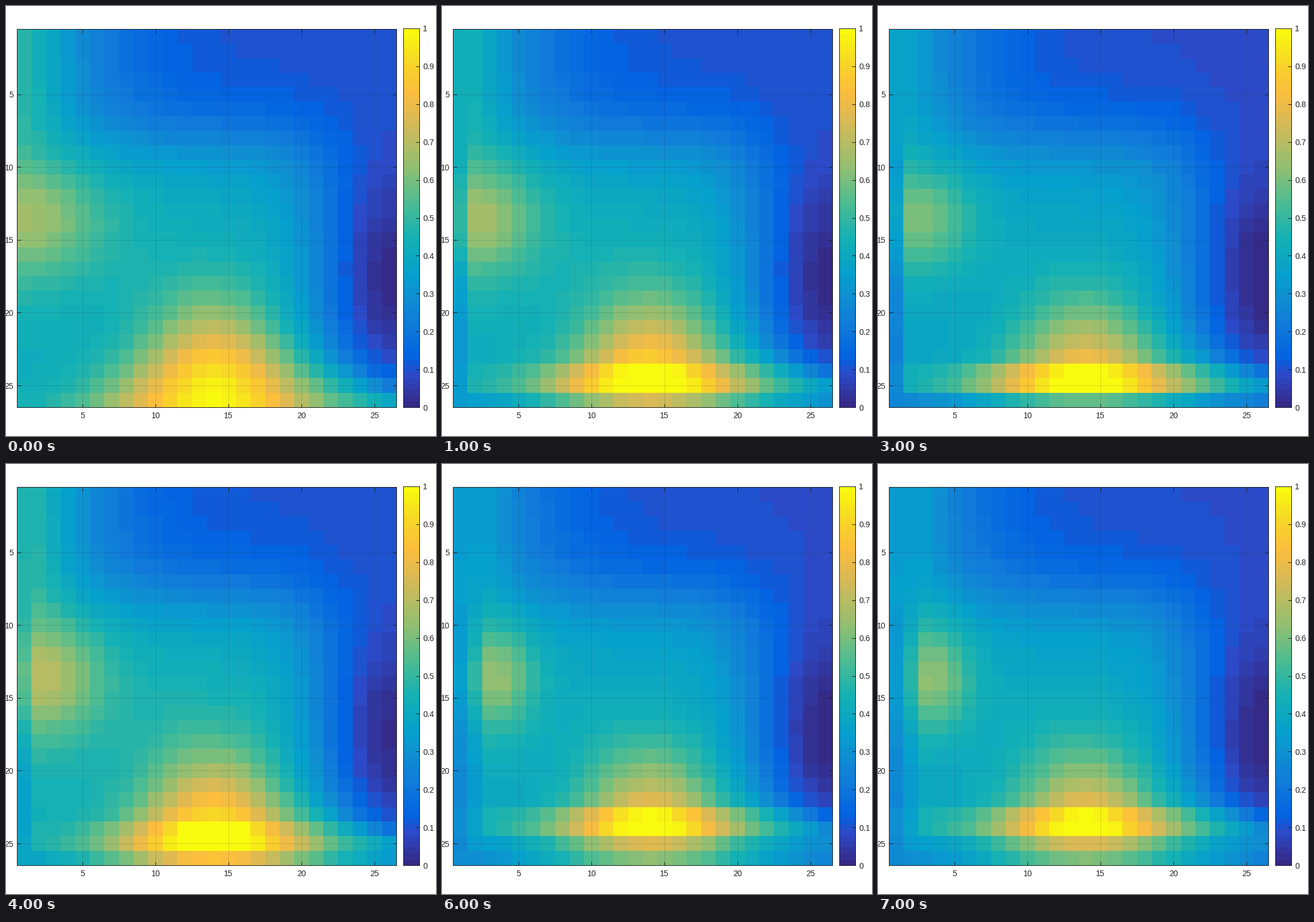
A matplotlib script that plays this animation: 748 px wide and 748 px high, repeating every 8 s.

```python
import numpy as np
import matplotlib.pyplot as plt
from matplotlib.animation import FuncAnimation
from matplotlib.colors import LinearSegmentedColormap

SIZE, DPI, N = 748, 100, 26
PX = 72 / DPI  # one pixel in points
plt.rcParams["font.family"] = "Liberation Sans"

# Key colours with their position out of 63
PARULA = LinearSegmentedColormap.from_list("parula", [(p / 63, c) for p, c in (
    (0, "#352a87"), (5, "#2c4ac7"), (8, "#0363e1"), (13, "#1079da"),
    (18, "#108ed2"), (22, "#06a0cd"), (28, "#15b1b4"), (34, "#4dbc92"),
    (40, "#92bf72"), (48, "#d9ba56"), (53, "#fdbe3d"), (58, "#f7d826"),
    (63, "#f9fb0e"))], N=64)

# Overall warmth of the surface at each second
WARMTH = [.7, .65, .6, 0, 1, .4, .2, .15]

COL, ROW = np.meshgrid(np.arange(1, N + 1), np.arange(1, N + 1))


def bell(x, centre, width):
    return np.exp(-((x - centre) / width) ** 2)


def step(x, centre, width):
    return 1 / (1 + np.exp((centre - x) / width))


def field(second):
    warm = WARMTH[second]
    inset = (second >= 1) + (second >= 5)  # cells between hot spots and edges
    first, last = 1 + inset, N - inset

    # cool top right corner against a mild plateau that widens at the bottom
    rise = np.exp((np.minimum(ROW + .7 * inset, N) - N) / 1.8)
    plateau = step(ROW, 8.2, 1.5) * step(21 + 8 * rise, COL, 1.6)
    strip = np.exp(-((np.maximum(COL, first) - 1) / 5) ** 1.3)
    strip *= step(19.5, ROW, 1.5)
    heat = .09 + .012 * warm + (.31 + .1 * warm) * strip
    heat += (.29 + .035 * warm) * plateau * (1 - strip)

    # cold well on the right
    heat -= .105 * bell(COL, 26, 3.5) * bell(ROW, 17.5, 6.5)

    # hot spot on the left
    heat += ((.19 + .02 * inset) * bell(COL, first + .5, 5 - 1.2 * inset)
             * bell(ROW, 13.5, 3.6))

    # hot spot at the bottom, broader towards the edge
    spread = 4.6 + .075 * (ROW - 20) ** 2
    heat += (.6 * (.85 + .15 * warm) * bell(COL, 14, spread)
             * bell(ROW, N - inset / 4, 6.2))

    if inset:
        # ridge of two rows, then a fade out to the left and lower edges
        ridge = (ROW == last) | (ROW == last - 1)
        heat += (.07 + .1 * (1 - warm)) * ridge * bell(COL, 14, 10)
        left = np.maximum(first - COL, 0) * step(ROW, 9, 1)
        below = np.maximum(ROW - last, 0)
        heat *= 1 - (.35 - .18 * warm) * np.maximum(left, below) / inset
    return np.clip(heat, 0, 1)


def pixel_axes(x0, y0, x1, y1):
    """Axes whose border lines lie on the given pixel columns and rows."""
    ax = fig.add_axes([x0 / SIZE, 1 - (y1 + 1) / SIZE,
                       (x1 - x0) / SIZE, (y1 - y0) / SIZE])
    for spine in ax.spines.values():
        spine.set(linewidth=PX, color="#1a1a1a")
    ax.tick_params(direction="in", length=6.5 * PX, width=PX, color="#1a1a1a",
                   labelcolor="#262626", labelsize=14 * PX, pad=6 * PX)
    return ax


fig = plt.figure(figsize=(SIZE / DPI, SIZE / DPI), dpi=DPI, facecolor="white")

ax = pixel_axes(19, 39, 679, 697)
image = ax.imshow(field(0), cmap=PARULA, vmin=0, vmax=1, aspect="auto",
                  interpolation="nearest", extent=(.5, N + .5, N + .5, .5))
ticks = range(5, N, 5)
ax.set_xticks(ticks)
ax.set_yticks(ticks)
ax.tick_params(top=True, right=True)
ax.tick_params(axis="x", pad=8 * PX)
ax.grid(color="#262626", alpha=.17, linewidth=PX)

bar = pixel_axes(691, 38, 719, 697)
bar.imshow(np.linspace(0, 1, 64)[:, None], cmap=PARULA, aspect="auto",
           origin="lower", interpolation="nearest", extent=(0, 1, 0, 1))
levels = np.arange(11) / 10
bar.set_xticks([])
bar.set_yticks(levels, [f"{v:g}" for v in levels])
bar.yaxis.tick_right()


def update(frame):
    image.set_data(field(frame))
    return [image]


anim = FuncAnimation(fig, update, frames=len(WARMTH), interval=1000,
                     repeat=True, repeat_delay=0, blit=False)
plt.show()
```
